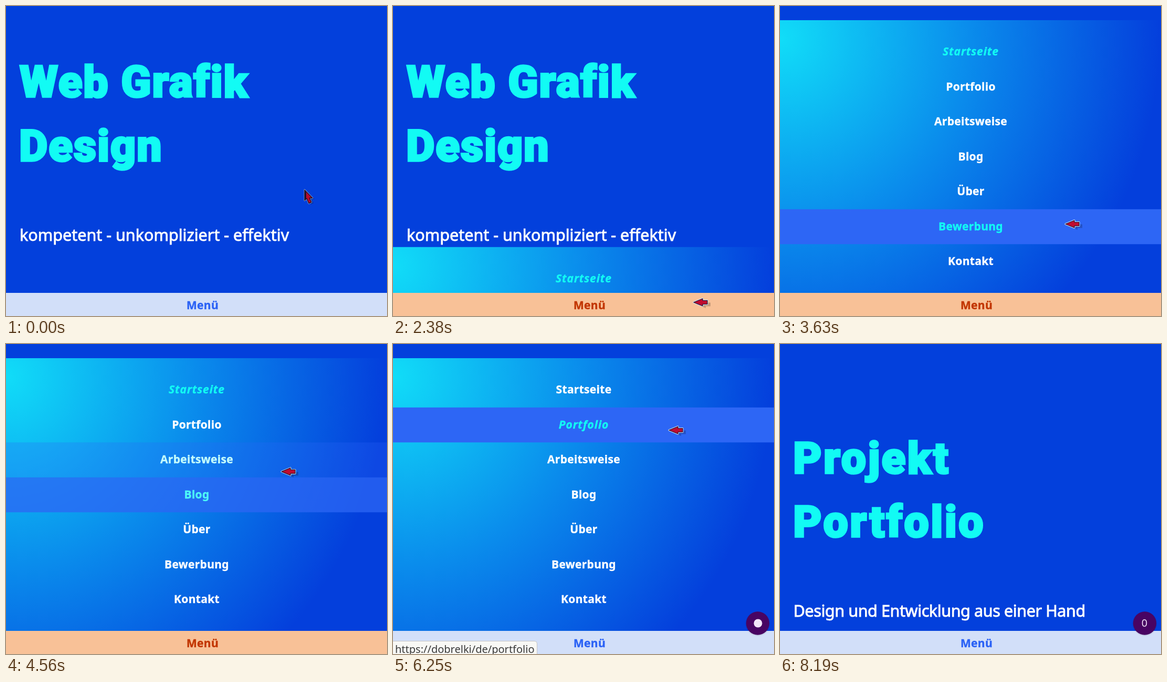
An HTML page that plays this animation: 726x590 px, repeating every 8.7 s.

```html
<!DOCTYPE html>
<html lang="de">
<head>
<meta charset="utf-8">
<title>Web Grafik Design</title>
<style>
  html, body { margin: 0; width: 100%; height: 100%; overflow: hidden; background: #0340dc; }
  svg { display: block; font-family: "Noto Sans", "Open Sans", sans-serif; }
  .head { font: 900 84px Roboto, "Noto Sans", sans-serif; fill: #12fbf4; stroke: #12fbf4; stroke-width: 3.5; }
  .sub { font-size: 30.5px; fill: #fff; stroke: #fff; stroke-width: .9; }
  .item { font-weight: 700; font-size: 21px; letter-spacing: .3px; text-anchor: middle; stroke-width: .4; }
  .active { font-style: italic; letter-spacing: .9px; }
  #home .head { letter-spacing: 1.9px; }
  #work .head { letter-spacing: 3.4px; }
  #work .sub { letter-spacing: -.4px; }
</style>
</head>
<body>
<svg width="726" height="590" viewBox="0 0 726 590">
  <defs>
    <radialGradient id="glow" gradientUnits="userSpaceOnUse" cx="0" cy="35" r="724">
      <stop offset="0" stop-color="#11ddf8"/>
      <stop offset=".5" stop-color="#0a8cec"/>
      <stop offset="1" stop-color="#043fdc"/>
    </radialGradient>
    <path id="handShape" d="M0 0L17-7V-3.500H26V3.500H17V7Z"/>
    <path id="arrowShape" d="M0 0V20L4 16.500L8 25.500L13 23.500L9.500 15.500H15Z"/>
  </defs>
  <rect width="726" height="590" fill="#0340dc"/>

  <g id="home">
    <text class="head" x="26" y="173">Web Grafik</text>
    <text class="head" x="25" y="295">Design</text>
    <text class="sub" x="26" y="447">kompetent - unkompliziert - effektiv</text>
  </g>
  <g id="work">
    <text class="head" x="25" y="246">Projekt</text>
    <text class="head" x="25" y="367">Portfolio</text>
    <text class="sub" x="25.500" y="519">Design und Entwicklung aus einer Hand</text>
  </g>

  <g id="panel"><rect id="back" width="726" fill="url(#glow)"/></g>

  <rect id="bar" y="546" width="726" height="44"/>
  <text id="barText" class="item" x="374.500" y="577">Menü</text>

  <g id="status">
    <path d="M-1 565.500H269Q274.500 565.500 274.500 571V591H-1Z" fill="#f8f8f5" stroke="#c4c4c4"/>
    <text x="4" y="588" font-size="20" fill="#3a3a3a">https://dobrelki/de/portfolio</text>
  </g>

  <g id="badge">
    <circle cx="695" cy="532.500" r="23.500" opacity=".06"/>
    <circle cx="695" cy="531.500" r="22.200" fill="#480463"/>
    <circle id="dot" cx="695.500" cy="531.500" r="8" fill="#f1e4f8"/>
    <text id="count" x="694.500" y="538" font-size="20" text-anchor="middle" fill="#f1e4f8">0</text>
  </g>

  <g id="cursor" stroke-linejoin="round">
    <g id="hand">
      <use href="#handShape" x="6" y="4" opacity=".2"/>
      <use href="#handShape" stroke="#cfe4f6" stroke-width="3"/>
      <use href="#handShape" fill="#c00c30" stroke="#2a1030" stroke-width="1.200"/>
    </g>
    <g id="arrow">
      <use href="#arrowShape" x="4" y="2" opacity=".2"/>
      <use href="#arrowShape" stroke="#a9c6ee" stroke-width="2.600"/>
      <use href="#arrowShape" fill="#b8082e" stroke="#20102c" stroke-width="1.400"/>
      <path d="M0 0V20L3 17V4Z" fill="#20102c"/>
    </g>
  </g>
</svg>

<script>
const LOOP = 8700, TICK = 62.5, FADE = 130;
const BAR_Y = 546, PANEL_H = 519, ROW_H = 66.5, ROW_TOP = 27.3;
const NEW_PAGE = 6125, COUNTED = 8187;

const WHITE = [255, 255, 255], CYAN = [18, 251, 244], BLUE = [45, 102, 245];
const SKY = [210, 223, 249], PEACH = [248, 193, 151];
const INK = [43, 98, 245], RUST = [194, 54, 0];

// mouse moves: start, end, x, y, easing power
const HOME = [569, 350];
const moves = [
  [570, 812, 567, 441],
  [950, 1500, 573, 564],
  [2880, 3625, 544, 415],
  [3690, 3812, 531, 360],
  [3880, 4000, 530, 328],
  [4130, 4562, 525, 243, 2],
  [4562, 5062, 526, 164],
  [7505, 7875, 57, 37]
];

const $ = id => document.getElementById(id);
const show = (id, on) => { $(id).style.display = on ? "" : "none"; };
const ramp = (t, from, span) => Math.max(0, Math.min(1, (t - from) / span));
const pulse = (t, on, off, span) => ramp(t, on, span) - ramp(t, off, span);
const smooth = k => k * k * (3 - 2 * k);
const blend = (a, b, k) => a.map((v, i) => v + (b[i] - v) * k);
const rgb = c => `rgb(${c.map(Math.round)})`;

const mouse = t => moves.reduce(
  (p, [from, to, x, y, ease = 1]) => blend(p, [x, y], ramp(t, from, to - from) ** ease), HOME);

const rowAt = t => Math.floor((mouse(t)[1] - BAR_Y + PANEL_H - ROW_TOP) / ROW_H);

// share of the last FADE ms spent over a row: a linear fade in and out
function hover(row, t) {
  const n = 16;
  let hits = 0;
  for (let i = 0; i < n; i++) hits += rowAt(t - FADE * (i + .5) / n) === row;
  return hits / n;
}

function add(tag, attrs) {
  const el = document.createElementNS("http://www.w3.org/2000/svg", tag);
  for (const k in attrs) el.setAttribute(k, attrs[k]);
  return $("panel").appendChild(el);
}

const labels = ["Startseite", "Portfolio", "Arbeitsweise", "Blog", "Über", "Bewerbung", "Kontakt"];
const rows = labels.map((label, i) => {
  const y = ROW_TOP + i * ROW_H;
  const band = add("rect", { y, width: 726, height: ROW_H });
  const text = add("text", { x: 363.5, y: y + 40 });
  text.textContent = label;
  return { band, text };
});

function paint(el, color) {
  el.style.fill = el.style.stroke = rgb(color);
}

function drawMenu(t, later) {
  const h = PANEL_H * (smooth(ramp(t, 2331, 169)) - smooth(ramp(t, 6315, 185)));
  show("panel", h > 0);
  $("panel").setAttribute("transform", `translate(0 ${BAR_Y - h})`);
  $("back").setAttribute("height", h);

  const press = pulse(t, 5500, 6065, 115);
  rows.forEach(({ band, text }, i) => {
    const over = hover(i, t);
    const down = i === 1 ? press : 0;
    const active = i === (later ? 1 : 0);
    band.style.opacity = over;
    band.style.fill = rgb(blend(BLUE, CYAN, down));
    text.setAttribute("class", active ? "item active" : "item");
    paint(text, blend(blend(WHITE, CYAN, active ? 1 : over), BLUE, down));
  });

  const warm = pulse(t, 1360, 5510, FADE);
  $("bar").style.fill = rgb(blend(SKY, PEACH, warm));
  paint($("barText"), blend(INK, RUST, warm));
}

function draw(t) {
  const later = t >= NEW_PAGE;
  show("home", !later);
  show("work", later);
  drawMenu(t, later);

  $("status").style.opacity = pulse(t, 5130, 7005, 200);
  show("badge", later);
  show("dot", t < COUNTED);
  show("count", t >= COUNTED);

  const link = t >= 1360 && t < 6750;
  show("cursor", t < 8000);
  show("hand", link);
  show("arrow", !link);
  $("cursor").setAttribute("transform", `translate(${mouse(t)})`);
}

const start = performance.now();
function loop() {
  const t = (performance.now() - start) % LOOP;
  draw(Math.floor((t + 3) / TICK) * TICK);
  requestAnimationFrame(loop);
}
loop();
</script>
</body>
</html>
```
